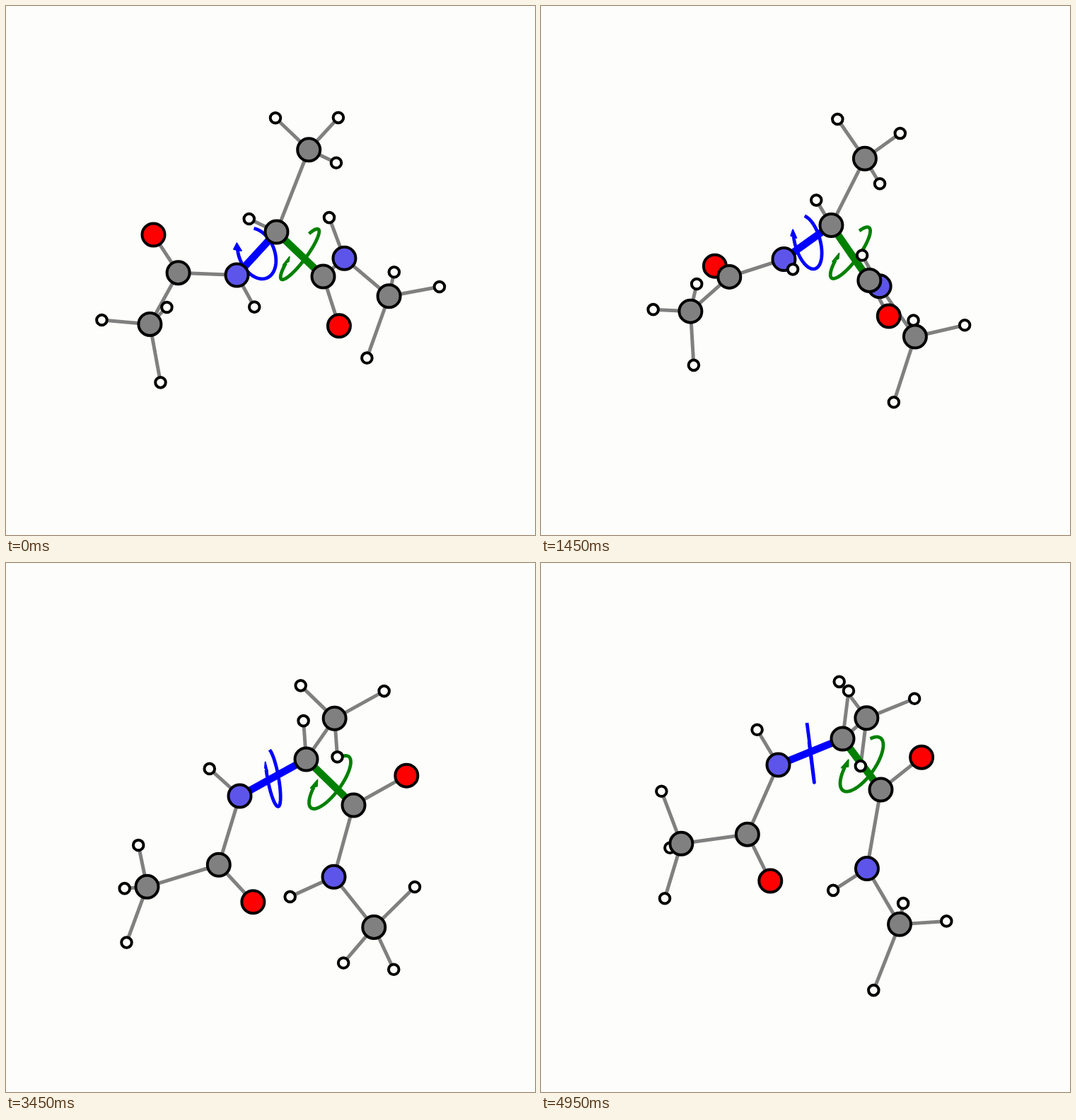
Write an HTML page with a canvas that moves like this. It is 748 px wide and 748 px high and loops after 5 s.

```html
<!DOCTYPE html>
<html lang="en">
<head>
<meta charset="utf-8">
<title>Dihedral rotation</title>
<style>
  html, body { margin: 0; width: 100%; height: 100%; overflow: hidden; background: #fdfdfb; }
  canvas { display: block; }
</style>
</head>
<body>
<canvas width="748" height="748"></canvas>
<script>
const ctx = document.querySelector('canvas').getContext('2d');
const LOOP = 5000, STEP = 50, LAST = LOOP - STEP;
const ANGSTROM = 80, CH = 87; // pixels
const BLUE = '#0000ff', GREEN = '#008000';
const FILL = { H: '#fdfdfb', C: '#808080', N: '#5d55ea', O: '#ff0000' };

// Weighted sum of 2D vectors: sum([weight, vector], ...)
const sum = (...terms) => [0, 1].map(k => terms.reduce((s, [w, v]) => s + w * v[k], 0));
const add = (a, b) => sum([1, a], [1, b]);
const bondAxis = (from, to, length) => sum([1 / length / ANGSTROM, to], [-1 / length / ANGSTROM, from]);
const drift = (from, to) => t => sum([1 - t / LAST, from], [t / LAST, to]);
const polar = (p, q, degrees) => {
  const angle = degrees * Math.PI / 180;
  return sum([Math.cos(angle), p], [Math.sin(angle), q]);
};

// Smooth path through one point per key time
const KEYS = [0, 850, 2100, 2950, 3450, 4300, LAST];
function path(...points) {
  const last = KEYS.length - 1;
  const slope = k => {
    const a = Math.max(k - 1, 0), b = Math.min(k + 1, last), d = KEYS[b] - KEYS[a];
    return sum([1 / d, points[b]], [-1 / d, points[a]]);
  };
  return t => {
    let i = 0;
    while (i < last - 1 && t >= KEYS[i + 1]) i++;
    const d = KEYS[i + 1] - KEYS[i], s = (t - KEYS[i]) / d, ease = s * s * (3 - 2 * s);
    return sum([1 - ease, points[i]], [ease, points[i + 1]],
      [s * (1 - s) ** 2 * d, slope(i)], [s * s * (s - 1) * d, slope(i + 1)]);
  };
}

// Backbone, and the in-plane normals of the two flat peptide groups
const alaNPath = path([326, 380], [340, 371], [342, 342], [329, 328], [330, 329], [326, 295], [335, 285]);
const alphaPath = path([382, 319], [401, 317], [417, 299], [419, 282], [424, 277], [419, 248], [426, 248]);
const alaCPath = path([448, 382], [461, 386], [467, 385], [481, 362], [491, 342], [472, 314], [480, 320]);
const leftNormal = path([-.62, -.36], [-.56, -.26], [-.37, .39], [.1, .9], [.17, .8], [.1, .85], [0, .89]);
const rightNormal = path([-.05, .52], [.03, .27], [.14, .15], [.46, -.27], [.56, -.8], [.28, -.88], [.42, -.88]);

// Half the difference between the two side directions at the alpha carbon
const sideSplit = drift([.41, -.37], [.09, .27]);
const aceSpin = [drift([-68, -6], [-16, 6]), drift([24, -24], [-28, -74])];

// The three hydrogens of a methyl group add up to its bond axis
const thirdHydrogen = (axis, a, b) => sum([CH, axis], [-1, a], [-1, b]);

function pose(t) {
  const alaN = alaNPath(t), alpha = alphaPath(t), alaC = alaCPath(t);
  const left = bondAxis(alaN, alpha, 1.46), right = bondAxis(alpha, alaC, 1.52);

  // Flat groups: distance along the torsion axis and away from it
  const planar = (origin, axis, normal) => (along, away) =>
    sum([1, origin], [along * ANGSTROM, axis], [away * ANGSTROM, normal]);
  const onLeft = planar(alaN, left, leftNormal(t));
  const onRight = planar(alaC, right, rightNormal(t));
  const aceC = onLeft(-.7, 1.13), aceMethyl = onLeft(-2.2, .78);
  const nmeN = onRight(.58, -1.195), nmeMethyl = onRight(2.02, -1.345);

  // Tetrahedral alpha carbon with a staggered methyl group
  const split = sideSplit(t);
  const toBeta = sum([.56, left], [-.56, right], [1, split]);
  const toH = sum([.56, left], [-.56, right], [-1, split]);
  const beta = sum([1, alpha], [122, toBeta]);

  const [ace1, ace2] = aceSpin.map(h => h(t));
  const ace3 = thirdHydrogen(bondAxis(aceC, aceMethyl, 1.51), ace1, ace2);

  const nmeAxis = bondAxis(nmeN, nmeMethyl, 1.45);
  const spin = 118 * Math.min(1, t / 4300) ** 2.7;
  const [nme1, nme2, nme3] = [240, 120, 0].map(offset =>
    sum([1, nmeMethyl], [CH / 3, nmeAxis], [1, polar([-47, 74], [37, 12], spin + offset)]));

  // Listed from back to front
  return {
    aceH1: ['H', add(aceMethyl, ace1)],
    nmeH1: ['H', nme1],
    alphaH: ['H', sum([1, alpha], [CH, toH])],
    aceO: ['O', onLeft(-.18, 2.24)],
    aceC: ['C', aceC],
    aceMethyl: ['C', aceMethyl],
    alaN: ['N', alaN],
    beta: ['C', beta],
    alpha: ['C', alpha],
    nmeN: ['N', nmeN],
    nmeMethyl: ['C', nmeMethyl],
    alaC: ['C', alaC],
    alaO: ['O', onRight(.615, 1.065)],
    alaH: ['H', onLeft(-.48, -.87)],
    nmeH: ['H', onRight(.01, -2.015)],
    aceH2: ['H', add(aceMethyl, ace2)],
    aceH3: ['H', add(aceMethyl, ace3)],
    betaH1: ['H', sum([1, beta], [-CH, right])],
    betaH2: ['H', sum([1, beta], [CH, left])],
    betaH3: ['H', sum([1, beta], [-CH, toH])],
    nmeH2: ['H', nme2],
    nmeH3: ['H', nme3]
  };
}

const bonds = {
  aceMethyl: ['aceH1', 'aceH2', 'aceH3', 'aceC'],
  aceC: ['aceO', 'alaN'],
  alaN: ['alaH'],
  alpha: ['alphaH', 'beta'],
  beta: ['betaH1', 'betaH2', 'betaH3'],
  alaC: ['alaO', 'nmeN'],
  nmeN: ['nmeH', 'nmeMethyl'],
  nmeMethyl: ['nmeH1', 'nmeH2', 'nmeH3']
};

// u points to the start of the arc, v a quarter turn further on
const torsions = [
  { from: 'alaN', to: 'alpha', color: BLUE, sweep: 270,
    u: drift([-4, -35.5], [-5, -41]), v: drift([27, 5], [2, 14]) },
  { from: 'alpha', to: 'alaC', color: GREEN, sweep: 285,
    u: drift([13, -29], [12, -36]), v: drift([24, -21], [28, -14]) }
];

function strokePath(points, color, width) {
  ctx.beginPath();
  points.forEach(p => ctx.lineTo(...p));
  ctx.strokeStyle = color;
  ctx.lineWidth = width;
  ctx.stroke();
}

function drawRing(a, b, u, v, sweep, color) {
  const center = sum([.5, a], [.5, b]);
  const arc = Array.from({ length: 61 }, (_, i) => add(center, polar(u, v, sweep * i / 60)));
  strokePath(arc, color, 4.8);
  const end = arc.at(-1), radial = polar(u, v, sweep), ahead = polar(u, v, sweep + 90);
  ctx.beginPath();
  ctx.moveTo(...sum([1, end], [.27, ahead]));
  for (const side of [-.2, .2]) ctx.lineTo(...sum([1, end], [side, radial]));
  ctx.closePath();
  ctx.fillStyle = color;
  ctx.fill();
  ctx.lineWidth = 2;
  ctx.stroke();
}

function draw(t) {
  const atoms = pose(t), at = name => atoms[name][1];
  ctx.setTransform(1, 0, 0, 1, 0, 0);
  ctx.fillStyle = '#fdfdfb';
  ctx.fillRect(0, 0, 748, 748);
  ctx.translate(.5, .5);
  ctx.lineJoin = 'round';
  for (const [a, others] of Object.entries(bonds))
    for (const b of others) strokePath([at(a), at(b)], '#808080', 5);
  for (const { from, to, color } of torsions) strokePath([at(from), at(to)], color, 10.5);
  for (const { from, to, u, v, sweep, color } of torsions)
    drawRing(at(from), at(to), u(t), v(t), sweep, color);
  for (const [element, center] of Object.values(atoms)) {
    ctx.beginPath();
    ctx.arc(...center, element === 'H' ? 7.3 : 16, 0, 2 * Math.PI);
    ctx.fillStyle = FILL[element];
    ctx.fill();
    ctx.strokeStyle = '#000';
    ctx.lineWidth = 4;
    ctx.stroke();
  }
}

const start = performance.now();
function tick() {
  const t = (performance.now() - start) % LOOP;
  draw(Math.floor(t / STEP) * STEP);
  requestAnimationFrame(tick);
}
tick();
</script>
</body>
</html>
```
